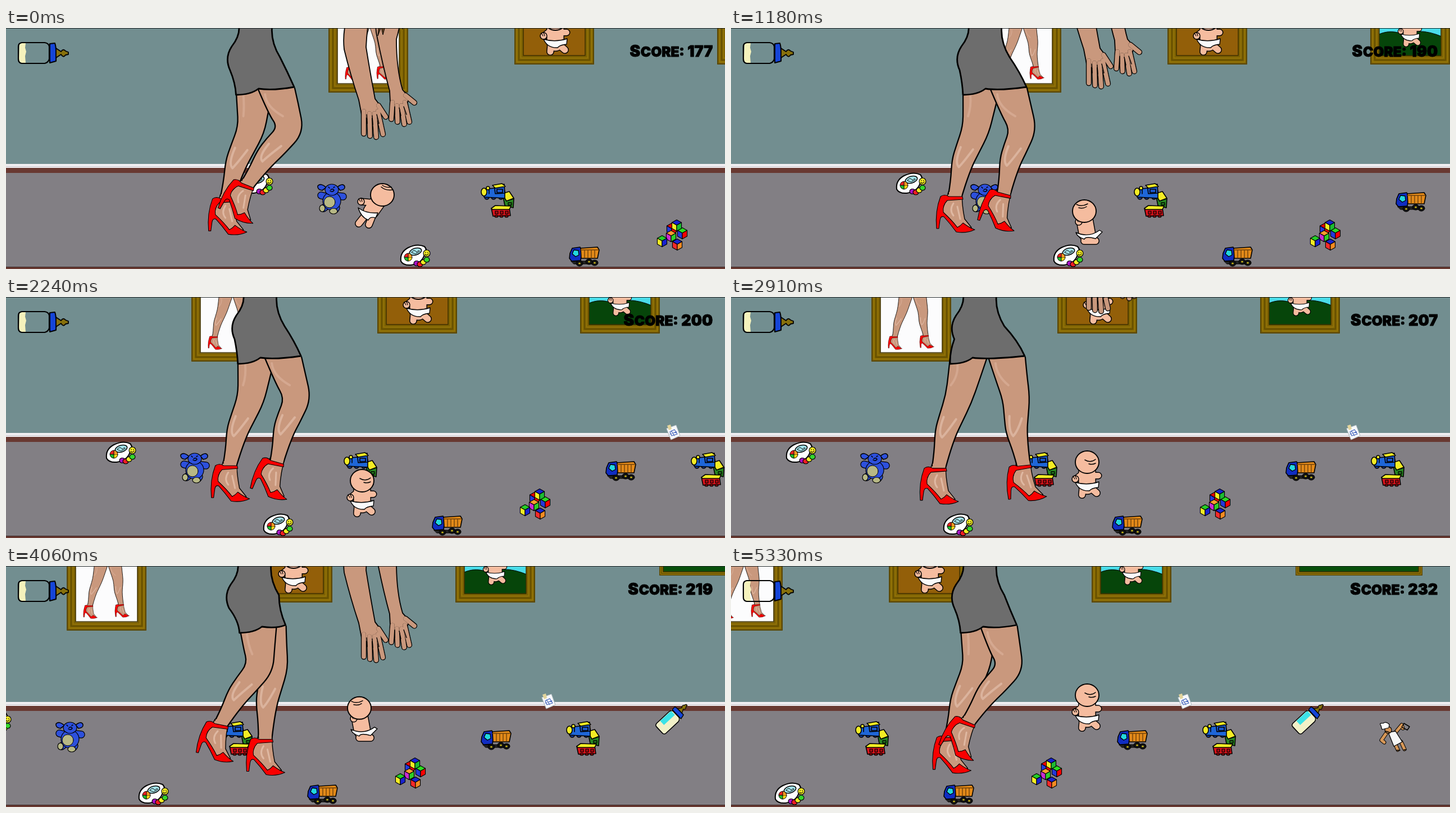
An HTML page with a canvas that plays this animation: 1280 px wide and 429 px high, repeating every 5.43 s.

```html
<!DOCTYPE html>
<html lang="en">
<head>
<meta charset="utf-8">
<title>Nursery run</title>
<style>
html, body { margin: 0; width: 100%; height: 100%; overflow: hidden; background: #728e90; }
canvas { display: block; width: 1280px; height: 429px; }
</style>
</head>
<body>
<canvas id="stage" width="1280" height="429"></canvas>
<script>
const c = document.getElementById('stage').getContext('2d');
const LOOP = 5430, STEP = 97, STRIDE = 1070, CONTACT = 1178, TUMBLE = 745;
const SKIN = '#c9987d', BABY = '#f5bc9f', RED = '#fa0000', BLUE = '#1545d8', OLIVE = '#87700c', GREEN = '#35d52c', YELLOW = '#f4ec24';

// The picture changes in bursts of six steps.
const BURSTS = [200, 790, 1380, 1950, 2530, 3100, 3670, 4260, 4840];

// Key points over time in ms
const POINTS = [[0, 177], [1178, 190], [2241, 200], [3670, 216], [4551, 225], [5325, 232]];
const REACH = [[0, 198], [1178, 108], [1800, -20], [2750, -20], [3670, 250], [4551, 72], [5000, -20]];
const HEAD = [[0, 297], [1178, 326], [2241, 327], [2918, 294], [4551, 235], [5325, 230]];

// One stride of one leg: phase, hip x, knee x, ankle x, ankle y, foot turn
const GAIT = [
  [0, 494, 520, 486, 293, 15],
  [.126, 491, 508, 521, 298, -6],
  [.152, 473, 490, 482, 307, 0],
  [.329, 440, 437, 390, 305, 0],
  [.5, 446, 436, 399, 298, 0],
  [.626, 423, 405, 370, 303, 0],
  [.652, 443, 445, 375, 283, 8],
  [.829, 468, 478, 410, 273, 25],
  [.899, 481, 507, 430, 278, 22]
];
GAIT.push([1, ...GAIT[0].slice(1)]);

function mix(rows, x) {
  let i = 1;
  while (i < rows.length - 1 && rows[i][0] < x) i++;
  const a = rows[i - 1], b = rows[i], k = Math.min(1, (x - a[0]) / (b[0] - a[0]));
  return a.map((v, j) => v + (b[j] - v) * k);
}
const at = (rows, x) => mix(rows, x)[1];
const scroll = t => Math.round(.109 * t + .0157 * Math.max(0, t - 2540));

function shape(d, fill, line = 1.6, ink = '#000') {
  const p = typeof d === 'string' ? new Path2D(d) : d;
  if (fill) { c.fillStyle = fill; c.fill(p); }
  if (line) { c.strokeStyle = ink; c.lineWidth = line; c.stroke(p); }
}
function oval(x, y, rx, ry, fill, line = 1.6, turn = 0) {
  const p = new Path2D();
  p.ellipse(x, y, rx, ry, turn, 0, 7);
  shape(p, fill, line);
}
function box(x, y, w, h, fill) {
  c.fillStyle = fill;
  c.fillRect(x, y, w, h);
}
// Rounded limbs sharing one outline; parts are [path, width].
function limbs(parts, fill, line = 3) {
  for (const [extra, ink] of [[line, '#000'], [0, fill]])
    for (const [d, w] of parts) shape(d, null, w + extra, ink);
}
function place(x, y, draw, sx = 1, sy = sx, turn = 0) {
  c.save();
  c.translate(x, y);
  c.rotate(turn * Math.PI / 180);
  c.scale(sx, sy);
  draw();
  c.restore();
}

function room() {
  box(0, 0, 1280, 429, '#728e90');
  box(0, 242, 1280, 7, '#f1eff2');
  box(0, 246, 1280, 1, '#c9c5cb');
  box(0, 249, 1280, 9, '#693931');
  box(0, 258, 1280, 168, '#827f84');
  box(0, 425, 1280, 4, '#693931');
  box(0, 425, 1280, 1, '#392220');
}

function picture(x, w, h, rim, back, draw) {
  box(x, 0, w, h, '#7c6002');
  ['#5b4803', '#967708', '#665000', '#927309'].forEach((ink, i) => {
    const inset = 1 + i * rim / 4.6;
    c.strokeStyle = ink;
    c.lineWidth = 2;
    c.strokeRect(x + inset, -20, w - 2 * inset, h + 20 - inset);
  });
  c.save();
  c.beginPath();
  c.rect(x + rim, 1, w - 2 * rim, h - rim);
  c.clip();
  box(x, 0, w, h, back);
  if (draw) draw();
  c.restore();
  c.strokeStyle = '#3e3000';
  c.lineWidth = 1.5;
  c.strokeRect(x + rim, -5, w - 2 * rim, h - rim + 5);
}

function gallery(o) {
  const a = 574 - o, b = 905 - o, d = 1266 - o;
  picture(a, 142, 115, 16, '#fcfcfd', () => place(a - 92, -40, () => legs(.626), .362));
  picture(b, 142, 65, 16, '#935f09', () => place(b + 73, -16, () => baby('S')));
  picture(d, 142, 65, 16, '#49dce8', () => {
    shape(`M${d} 20Q${d + 30}-2 ${d + 60} 12Q${d + 92}-4 ${d + 142} 22V65H${d}Z`, '#06450a', 1);
    place(d + 71, -18, () => baby('S'), .8);
  });
  picture(1629 - o, 226, 17, 7, '#07500b');
}

function plate() {
  shape('M1 29Q-1 13 14 5Q30-3 43 3Q50 11 42 20Q37 33 19 36Q5 37 1 29Z', '#fff', 2);
  oval(27, 12, 11, 6, '#a4e4ec', 1.5, -.3);
  shape('M20 13Q25 7 29 13Q34 8 34 12L27 16Z', null, 1);
  ['#f5d817', '#1fbb2c', '#f52222', '#f59c22'].forEach((f, i) => {
    const q = new Path2D();
    q.moveTo(14, 22);
    q.arc(14, 22, 7, i * Math.PI / 2, (i + 1) * Math.PI / 2);
    shape(q, f, 1);
  });
  ['#a712c6', '#ef1e24', YELLOW, GREEN].forEach((f, i) => oval(29 + i * 6, 33 + 2 * Math.sin(i * 1.6) - i * i * .5, 5, 4.5, f, 1.2));
  oval(47, 15, 6, 6, YELLOW, 1.2);
  shape('M44 17Q47 20 50 16M45 13V14M49 13V14', null, 1.2);
}

function teddy() {
  const fur = '#2d50dc';
  shape('M16 8Q6-1 1 5Q0 12 9 13ZM36 7Q46-1 49 6Q50 12 41 13Z', fur);
  limbs([['M15 24L7 22M36 23L46 24M15 42L11 45M34 44L32 47', 11]], fur, 2.5);
  oval(26, 32, 16, 16, fur, 1.2);
  oval(26, 12, 12, 10, fur, 1.2);
  oval(22, 34, 10, 10, '#b7b885', 1);
  oval(9, 45, 5, 6, '#b7b885', 1.2);
  oval(29, 50, 7, 5, '#b7b885', 1.2);
  shape('M20 7L22 9M29 8L31 7M24 12Q28 9 30 13Q27 17 23 14', null, 1.5);
}

function train() {
  shape('M38 18L50 15 58 27 57 43 42 39Z', '#288521');
  shape('M37 18L50 14 58 26 45 31Z', YELLOW);
  shape('M45 31L58 27M48 34H54V38H48Z', null, 1.3);
  for (const x of [10, 22, 35]) oval(x, 24, 4, 4, '#163b9c');
  shape('M5 10L24 8 42 13 42 26 5 24Z', '#1e66d8');
  shape('M23 3L41 1 42 17 25 18Z', '#1b58cb');
  shape('M20 3L37 0 43 5 25 8Z', YELLOW);
  shape('M28 10H38V16H28ZM14 10V18', null, 1.6);
  oval(5, 15, 5, 7, YELLOW);
  oval(12, 8, 3, 3, YELLOW);
  shape('M18 44L50 43 52 57 21 58Z', '#d9141b');
  shape('M18 44L25 39 53 40 50 46 20 46Z', YELLOW);
  for (const x of [25, 34, 43]) {
    shape(`M${x} 49h5v5h-5Z`, '#b00a12', 1.2);
    oval(x + 2, 58, 3, 2, '#7a080c', 1.2);
  }
}

function truck() {
  shape('M3 27H50V32H8Z', '#222', 1);
  shape('M1 13L5 4 19 2 22 8 20 26 4 27 0 22Z', '#102dc2');
  shape('M5 14L8 7 16 8 17 16 11 19Z', '#22d7df', 1.3);
  shape('M20 4L50 2 53 7 50 22 21 22Z', '#e38a19');
  shape('M20 7H52M27 8V21M33 8V21M39 8V21M45 8V21', null, 1.4, '#70420a');
  for (const [x, y] of [[18, 31], [45, 30], [35, 28]]) {
    oval(x, y, 6, 5, '#111', 1);
    oval(x, y, 2, 1.6, '#c2b11b', 0);
  }
}

function cube(x, y, top, left, right) {
  place(x, y, () => {
    shape('M-9-6L0-11 9-6 0-1Z', top, 1.2);
    shape('M-9-6L0-1V10L-9 5Z', left, 1.2);
    shape('M9-6L0-1V10L9 5Z', right, 1.2);
  }, .95);
}
function blocks() {
  cube(26, 18, RED, '#2438d9', RED);
  cube(45, 26, '#2bdc20', '#2438d9', RED);
  cube(35, 12, '#1822cf', YELLOW, '#1dbb32');
  cube(25, 31, '#ff9c2d', '#ca2bd1', '#2fcd26');
  cube(9, 40, '#24ce26', YELLOW, '#1822d0');
  cube(36, 46, '#1a24d0', '#f62929', '#f38b22');
}

function note() {
  shape('M1 7L18 1 25 20 9 27Z', '#f7f8fb', 1, '#a9b6bc');
  shape('M2 2L8 0 10 8 5 10Z', '#e2d49c', 0);
  shape('M7 13L15 9 20 17 10 20ZM9 11L15 20M7 17L19 13', null, 1.1, '#3a5dba');
}

function bottle(milk) {
  milk();
  shape('M7 1H48Q55 2 56 8V30Q55 36 48 38H7Q1 37 1 31V8Q1 2 7 1Z', null, 2.2);
  shape('M57 3L66 2Q69 10 68 34L57 37Z', BLUE, 2);
  shape('M68 11L77 17Q81 11 85 16L90 18V22L85 23Q81 29 77 22L68 28Z', OLIVE, 1.8);
}
const meter = () => shape('M3 4Q7 1 14 2L13 10 15 17 13 25 14 37H6Q2 35 2 28Z', '#f5f2bc', 0);
function milkFull() {
  box(2, 2, 54, 35, '#f2f1c8');
  box(17, 3, 36, 15, '#3ce2e7');
}

function chef() {
  limbs([['M14 20L5 33 10 37M31 18L41 6 43 12M29 39L34 50M40 36L46 49', 5]], '#d79858', 2);
  shape('M17 19L30 17 42 36 27 44Z', '#f6f6f6', 1.3);
  oval(17, 15, 6, 6, '#d39152', 1.2);
  shape('M6 14L4 7Q0 2 8 3Q13-1 19 5L18 11Z', '#fff', 1.2);
  shape('M41 10L45 3 55 9 51 15ZM12 17L19 19M32 51H38M45 50H49', null, 1.5);
}

const TOYS = [[plate, 422, 258], [teddy, 554, 276], [train, 846, 277], [train, 1464, 277], [truck, 1312, 291], [note, 1419, 227],
  [chef, 1777, 277], [blocks, 1159, 340], [plate, 702, 386], [truck, 1003, 388]];
function toys(o) {
  for (const [draw, x, y] of TOYS) place(x - o, y, draw);
  place(1620 - o, 283, () => bottle(milkFull), .74, .66, -43);
}

function leg([, hx, kx, ax, ay, turn]) {
  const hy = 107, ky = 181;
  // Centre line with half widths; the calf bows backwards.
  const down = (x, y, u, v, k, bow, w) => [x + (u - x) * k - bow, y + (v - y) * k, w];
  const spine = [[hx, hy, 33], down(hx, hy, kx, ky, .5, 0, 28), [kx, ky, 24],
    down(kx, ky, ax, ay, .3, 4, 21), down(kx, ky, ax, ay, .5, 6, 19), down(kx, ky, ax, ay, .8, 2, 13.5), [ax, ay, 12]];
  const side = s => spine.map(([x, y, w], i) => {
    const a = spine[Math.max(0, i - 1)], b = spine[Math.min(6, i + 1)];
    const dx = b[0] - a[0], dy = b[1] - a[1], l = Math.hypot(dx, dy);
    return i ? [x + s * dy / l * w, y - s * dx / l * w] : [x + s * w, y];
  });
  const p = new Path2D();
  for (const pts of [side(1), side(-1).reverse()]) {
    p.lineTo(...pts[0]);
    for (let i = 1; i < 6; i++) {
      const [x, y] = pts[i], [u, v] = pts[i + 1];
      p.quadraticCurveTo(x, y, i < 5 ? (x + u) / 2 : u, i < 5 ? (y + v) / 2 : v);
    }
  }
  place(ax, ay, () => shape('M-12-6L12-6Q12 18 17 42L29 57Q14 62 4 57Q-18 44-23 26Q-16 8-12-6Z', SKIN, 1.4), 1, 1, turn);
  shape(p, SKIN, 2.3);
  place(ax, ay, () => {
    shape('M-11-6L11-6 12 12-11 12Z', SKIN, 0);
    shape('M-3 14Q-11 26-3 36M4 20L9 42', null, 3, '#dfb8a2');
    shape('M-26 2Q-19-3-11 2L13 2 14 7-14 9Q-23 18-21 30Q-5 45 4 57Q10 54 14 49Q26 58 35 61Q20 68 2 65Q-9 50-20 38Q-26 36-27 44L-29 59-33 59Q-36 28-26 2Z', RED, 1.1);
  }, 1, 1, turn);
  // Sheen on thigh and calf
  c.globalAlpha = .45;
  const calf = spine[3], low = spine[4];
  shape(`M${hx - 20} 118Q${hx - 18} 140 ${kx - 14} ${ky - 24}`, null, 4, '#e2bba6');
  shape(`M${calf[0] - 12} ${calf[1] - 4}Q${low[0] - 14} ${low[1]} ${low[0] - 6} ${low[1] + 8}Q${low[0] + 2} ${low[1]} ${calf[0] + 10} ${calf[1]}`, null, 4, '#f0d3c4');
  c.globalAlpha = 1;
}
const pair = phase => [mix(GAIT, (phase + .5) % 1), mix(GAIT, phase)];
const legs = phase => pair(phase).forEach(leg);

function dress(phase) {
  const hips = pair(phase).map(row => row[1]);
  const l = Math.min(...hips) - 33, r = Math.max(...hips) + 32;
  const w = 413 + 10 * Math.cos(phase * 2 * Math.PI) ** 8;
  shape(`M${w}-4Q${w + 2} 14 ${w - 13} 33Q${w - 26} 53 ${w - 16} 75Q${l - 1} 98 ${l} 119Q${l + 26} 119 ${l + 40} 108Q${l + 65} 112 ${r} 105Q${r - 12} 78 ${w + 73} 52Q${w + 56} 24 ${w + 59}-4Z`, '#6d6d6d', 2.8);
}

// Standing, leaning, sitting turned away, crawling
const BODIES = {
  S: { x: 634, torso: 'M0 18L0 42', w: 29, arms: 'M-10 22L-20 30M10 24L20 24', legs: 'M-8 48L-9 58M9 48L17 55',
    diaper: 'M-21 36Q0 42 21 35L20 45Q8 46 4 51Q-14 52-21 36Z', face: 'M-4-4Q6 2 15-5M3 3Q9 5 15 2', hand: [-21, 30] },
  L: { x: 670, torso: 'M-8 12L-20 29', w: 26, arms: 'M-18 14L-37 12', legs: 'M-30 36L-42 51M-18 38L-24 53',
    diaper: 'M-43 23Q-28 34-8 32L-12 41Q-22 38-25 45Q-38 40-43 23Z', face: 'M-2-14Q6-7 19-9M0-17Q7-12 16-14', hand: [-38, 12] },
  T: { x: 629, torso: 'M1 18L5 40', w: 28, arms: 'M-4 18L-9 20', legs: 'M0 53L20 53',
    diaper: 'M-15 38Q8 48 27 34L32 37Q24 45 20 49Q2 44 0 50Q-13 46-15 38Z', face: 'M-14-12Q-5-7 6-13M-10-6Q-2-4 4-8', hand: [-10, 19] },
  D: { x: 629, torso: 'M4 18L9 34', w: 27, arms: 'M14 16L28 6M-6 30L-13 40', legs: 'M4 44L-3 54M16 43L35 40',
    diaper: 'M-6 36Q10 42 28 32L26 42Q14 44 10 49Q0 48-6 36Z', face: 'M-14-12Q-2-16 8-9M2-19Q9-18 13-21', hand: [28, 6] }
};
function baby(kind) {
  const b = BODIES[kind], [x, y] = b.hand;
  limbs([[b.torso, b.w], [b.arms, 10], [b.legs, 11]], BABY);
  shape(b.diaper, '#fafafa', 1.4);
  oval(x, y, 6, 6, BABY, 1.5);
  shape(`M${x - 4} ${y - 5}L${x - 1} ${y}M${x} ${y - 6}L${x + 2} ${y}`, null, 1.2);
  oval(0, 0, 21, 20, BABY, 1.9);
  shape(b.face, null, 1.5);
}

function arm(outline, fingers, creases) {
  limbs([[fingers, 7.5]], SKIN, 2.8);
  shape(outline, SKIN, 1.8);
  limbs([[fingers, 7.5]], SKIN, 0);
  shape(creases, null, 1.4);
}
function arms() {
  arm('M621-255Q597-205 602-160Q613-115 628-70L633-44 643-36 662-38 669-56 657-72Q648-120 641-164Q643-210 655-255Z',
    'M637-50L637-10M647-46L648-6M656-46L659-4M662-50L671-9M663-60L676-40', 'M642-44L643-28M652-42L653-26M660-44L664-28');
  arm('M668-255Q654-215 660-185Q671-130 683-86L684-66 693-54 711-56 718-74 706-88Q695-125 695-178Q705-215 710-255Z',
    'M688-66L686-36M696-60L697-31M704-60L709-27M710-66L718-31M711-78L727-65', 'M692-58L692-44M700-56L703-42M708-58L713-44');
  shape('M657-255H728L719-200 713-222 706-196 697-214 688-200 680-220 671-186 668-200 662-184 664-208 657-206Z', '#63401f', 1);
}

function score(value) {
  let x = 1259;
  c.fillStyle = c.strokeStyle = '#000';
  c.lineWidth = 1;
  for (const [text, size] of [[String(value), 27], ['CORE: ', 24.5], ['S', 28]]) {
    c.font = `900 ${size}px Inter, "Open Sans", sans-serif`;
    x -= c.measureText(text).width + .8;
    c.fillText(text, x, 51);
    c.strokeText(text, x, 51);
  }
}

// Moment of the latest picture change
function snap(t) {
  const from = BURSTS.filter(b => b <= t).pop();
  if (from === undefined) return 0;
  return from + STEP * Math.min(5, Math.floor((t - from) / STEP + .1));
}

function draw(t) {
  const o = scroll(t), phase = ((t - CONTACT) / STRIDE + 9) % 1;
  const kind = 'LTDS'[Math.floor(t / TUMBLE) % 4], reach = at(REACH, t);
  c.lineJoin = c.lineCap = 'round';
  room();
  gallery(o);
  toys(o);
  legs(phase);
  dress(phase);
  place(BODIES[kind].x, at(HEAD, t), () => baby(kind));
  place(-Math.max(0, reach - 198) / 5, reach, arms);
  place(21, 25, () => bottle(meter));
  box(0, 0, 1280, 1, '#23292b');
  score(Math.floor(at(POINTS, t) + .01));
}

const begin = performance.now();
(function play() {
  draw(snap((performance.now() - begin) % LOOP));
  requestAnimationFrame(play);
})();
</script>
</body>
</html>
```
